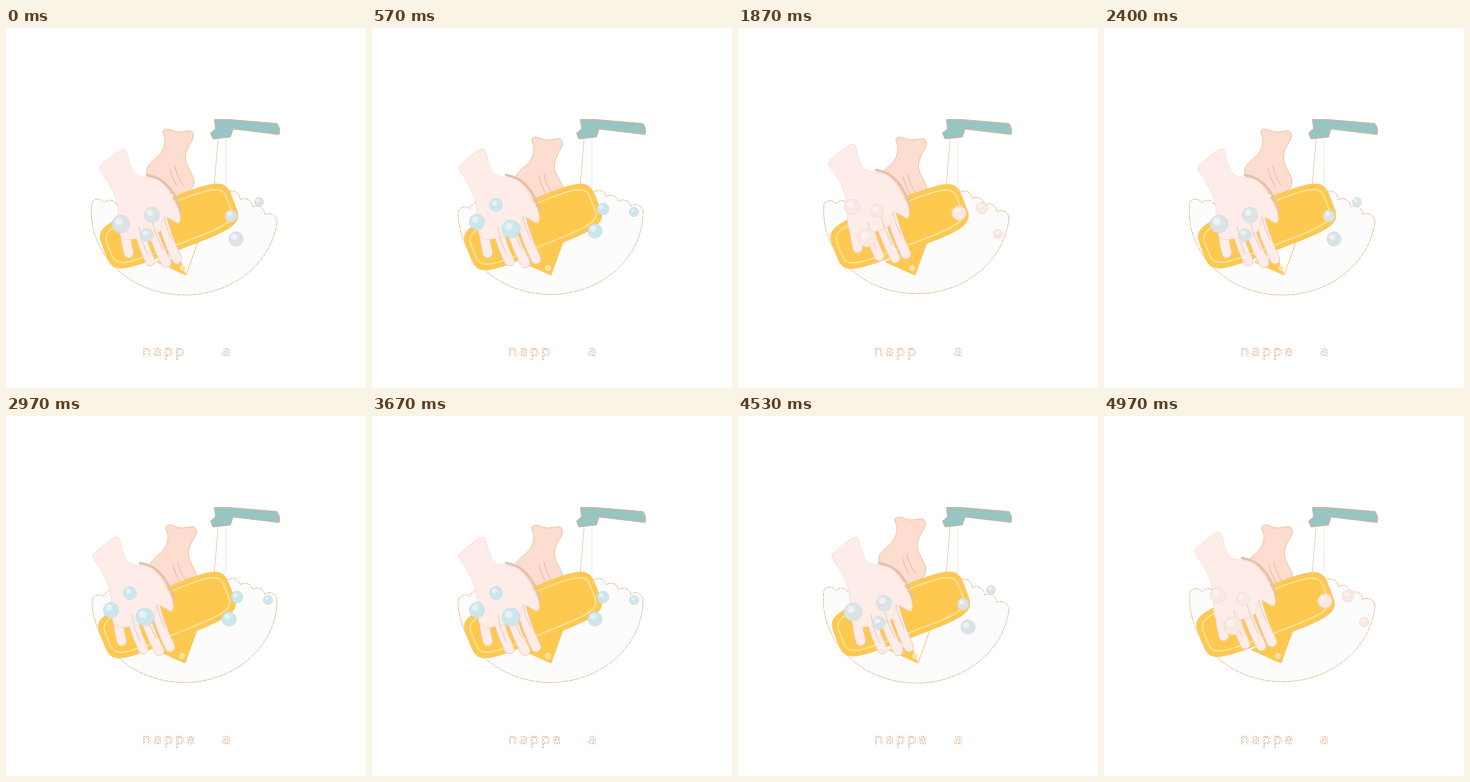
An HTML page that plays this animation: 360 by 360 pixels, repeating every 5000 ms.

```html
<!DOCTYPE html>
<html lang="en">
<head>
<meta charset="utf-8">
<title>Hand washing</title>
<style>
  html, body { margin: 0; width: 100%; height: 100%; overflow: hidden; background: #fff; }
  svg { display: block; width: 100%; height: 100%; }
  text { font: 15px "Noto Sans", sans-serif; letter-spacing: 2px; fill: #fff; stroke: #d8a987; stroke-width: .6; stroke-dasharray: 2 1; }
</style>
</head>
<body>
<svg id="stage" viewBox="0 0 360 360"></svg>
<script>
const LOOP = 5000;
const HOLD = 250;
const LATE_LETTER = 2100;
const EDGE = '#ebc09a';
const SKIN = '#fcddd0';
const HAND = '#fdece7';
const FOLD = '#ebcabd';
const YELLOW = '#ffc84e';

const points = text => text.split(' ').map(p => p.split(',').map(Number));
const move = ([x, y], body) => `<g transform="translate(${x} ${y})">${body}</g>`;
const path = (d, fill, stroke, width = .8, extra = '') =>
  `<path d="${d}" fill="${fill}" stroke="${stroke}" stroke-width="${width}" stroke-linecap="round" stroke-linejoin="round" ${extra}/>`;

// Closed Catmull-Rom curve.
function curve(pts) {
  const at = i => pts[(i + pts.length) % pts.length];
  return 'M' + at(0) + pts.map((p, i) => {
    const next = at(i + 1);
    const c1 = p.map((v, k) => v + (next[k] - at(i - 1)[k]) / 6);
    const c2 = next.map((v, k) => v - (at(i + 2)[k] - p[k]) / 6);
    return `C${c1} ${c2} ${next}`;
  }).join('') + 'Z';
}

// Row of round foam bumps from one point to another.
function foam([x0, y0], [x1, y1], count) {
  const r = Math.hypot(x1 - x0, y1 - y0) / count * .58;
  let d = `L${x0} ${y0}`;
  for (let i = 1; i <= count; i++) {
    const k = i / count;
    d += `A${r} ${r} 0 0 1 ${x0 + (x1 - x0) * k} ${y0 + (y1 - y0) * k}`;
  }
  return d;
}

function bowl([left, right]) {
  const d = `M271 ${right}A92 82 0 0 1 86 ${left}` +
    foam([86, left], [110, 176], 2) + foam([222, 164], [271, right], 4) + 'Z';
  return path(d, '#fcfcfc', EDGE, .9, 'stroke-dasharray="4 1.5"');
}

const stream = path('M212 112L208 163H220V112Z', '#fdfdfd', 'none') +
  path('M212 112L208 160', 'none', '#f1cdb0', .9, 'stroke-dasharray="4 1"') +
  path('M220 112V157', 'none', '#e6e6e4');

const faucet = path('M208.5 91.5H223L271 95.5Q275 101 273 106.5L227 101 224.5 109 207 111 204.5 105 209.5 101Z',
  '#98c4c2', '#c9ad93', .8, 'stroke-dasharray="3 1"');

const backHand = path(curve(points('158,112 162,109 173,112 186,111 188,118 182,130 181,142 189,162 178,174 150,168 142,149 156,133 160,121')),
  SKIN, EDGE) + path('M165 149Q167 158 172 166M170 146Q171 155 178 165', 'none', '#e4b9a3');

// Rounded box with soft corners.
function squircle(w, h) {
  const bend = v => Math.sign(v) * Math.abs(v) ** .42;
  return curve(Array.from({ length: 32 }, (_, i) => {
    const a = (i + .5) * Math.PI / 16;
    return [w * bend(Math.cos(a)), h * bend(Math.sin(a))];
  }));
}

const pad = (center, turn) => move(center, `<g transform="rotate(${turn})">` +
  path(squircle(69, 25.5), YELLOW, '#f8c465') +
  path(squircle(64, 20.5), 'none', '#ffe7a8', 1.3) + '</g>');

const wing = (shift, fill) => move([shift, 0],
  path('M148 234L177 247 190 211Z', fill, '#f6bf5c') +
  path('M148 234L177 247 171 230Z', YELLOW, 'none') +
  '<circle cx="174" cy="240" r="2.4" fill="#ffe09a" stroke="#fff0cc"/>');

function finger(i) {
  const x = 168 - 8 * i - 2.7 * i * i;
  const y = 226 + 7 * i - 3 * i * i;
  const d = `M${152 - 12 * i} 181Q${157 - 14 * i} 203 ${x} ${y}`;
  return path(d, 'none', FOLD, 10.4) + path(d, 'none', HAND, 9.2);
}

const palm = curve(points('91,136 97,128 115,116 121,131 128,142 151,148 166,169 171,182 169,190 155,184 151,198 130,205 112,203 108,170 99,149'));
const frontHand = path('M138 142Q163 146 172 179', 'none', '#e5c0a9', 2.4) +
  [0, 1, 2, 3].map(finger).join('') +
  path(palm, HAND, '#efd5ca', .5) +
  path('M155 184Q157 196 163 207M143 188Q146 202 154 217M130 194Q132 208 138 221', 'none', FOLD, .9);

// Two clusters of three, each shrinking in size.
function bubble([x, y], i, [fill, edge, shine]) {
  const r = (i < 3 ? 9 : 7.2) - i % 3 * 1.3;
  return `<circle cx="${x}" cy="${y}" r="${r}" fill="${fill}" stroke="${edge}" stroke-width=".6"/>` +
    `<circle cx="${x - r * .25}" cy="${y - r * .3}" r="${r * .4}" fill="${shine}"/>`;
}

const poses = [
  {
    rim: [174, 194], back: [-1, -8], hand: [3, 5], pad: [163, 198], turn: -21, wing: [3, '#fff'],
    look: ['#dbe3e6', '#d2dadd', '#edf2f4'],
    bubbles: '115,196 146,187 141,207 230,211 225,188 253,174'
  },
  {
    rim: [176, 190], back: [0, 0], hand: [0, 0], pad: [161.5, 198.5], turn: -21, wing: [0, YELLOW],
    look: ['#f9e8e3', '#f0d8cf', '#fcf2ef'],
    bubbles: '129,210 114,179 139,183 221,185 244,180 260,206'
  },
  {
    rim: [185, 183], back: [2, 0], hand: [-4, 5], pad: [161, 199], turn: -22, wing: [2, YELLOW],
    look: ['#cde6ec', '#c0dce3', '#e4f2f6'],
    bubbles: '139,201 105,194 124,177 223,203 231,181 262,184'
  }
];

const drawPose = p => '<g class="pose">' + bowl(p.rim) + stream +
  move(p.back, backHand) + wing(...p.wing) + pad(p.pad, p.turn) + move(p.hand, frontHand) +
  points(p.bubbles).map((spot, i) => bubble(spot, i, p.look)).join('') + '</g>';

const stage = document.getElementById('stage');
stage.innerHTML = poses.map(drawPose).join('') + faucet +
  '<text x="136" y="328">napp<tspan id="late">e</tspan></text><text x="216" y="328">a</text>';

const groups = [...stage.querySelectorAll('.pose')];
const late = document.getElementById('late');
const start = performance.now();

function show() {
  const t = (performance.now() - start) % LOOP;
  const current = Math.floor(t / HOLD) % groups.length;
  groups.forEach((g, i) => { g.style.display = i === current ? '' : 'none'; });
  late.style.display = t < LATE_LETTER ? 'none' : '';
  requestAnimationFrame(show);
}
show();
</script>
</body>
</html>
```
